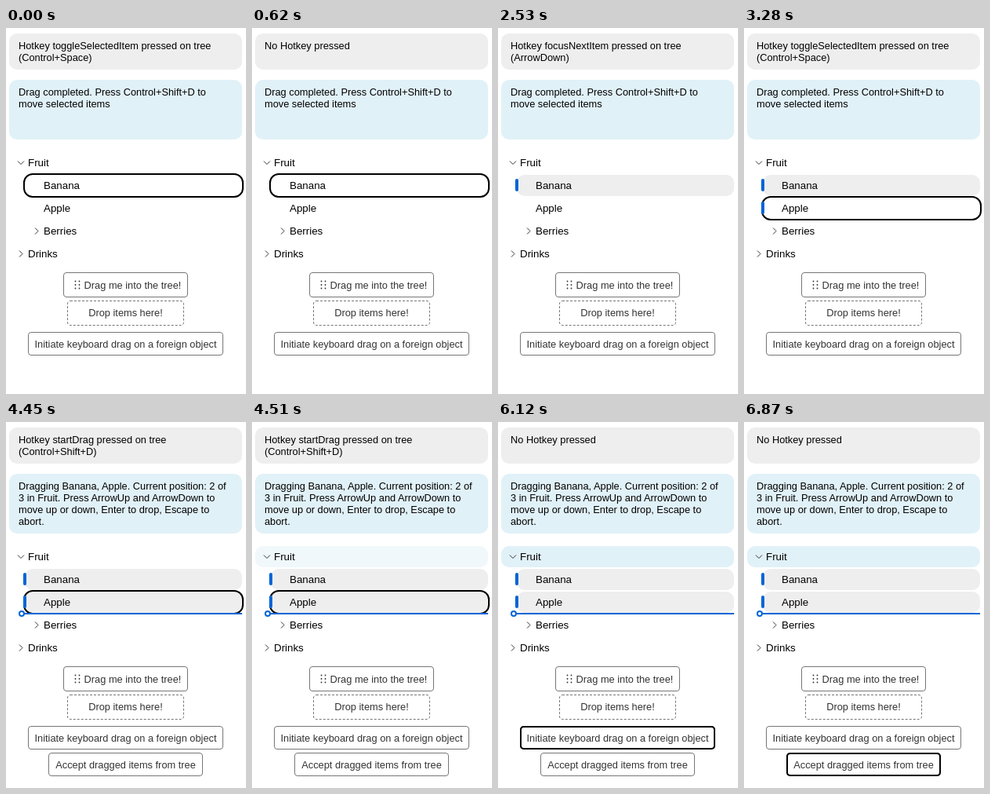
An HTML page for the animation above (8000 ms loop, 306 by 466 pixels).

```html
<!DOCTYPE html>
<html lang="en">
<head>
<meta charset="utf-8">
<title>Keyboard tree drag</title>
<style>
  html, body { margin: 0; width: 100%; height: 100%; overflow: hidden; background: #fff; }
  svg { display: block; }
  text { font: 12.8px "Liberation Sans", Arial, sans-serif; fill: #000; white-space: pre; }
  .item text { font-size: 13.333px; }
  .button text { fill: #333; text-anchor: middle; }
  .button rect { fill: none; stroke: #767676; }
  .button rect.focus { stroke: #000; stroke-width: 2; }
  .ring { fill: none; stroke: #000; stroke-width: 2; }
  .chevron { fill: none; stroke: #333; }
</style>
</head>
<body>
<svg id="stage" width="306" height="466" viewBox="0 0 306 466"></svg>
<script>
const NS = "http://www.w3.org/2000/svg";
const stage = document.getElementById("stage");
const LOOP = 8000, FADE = 200;
const GRAY = "#eee", PALE = "#e1f1f8", BLUE = "#0366d6";

function add(parent, tag, attrs = {}, content = "") {
  const el = document.createElementNS(NS, tag);
  for (const key in attrs) el.setAttribute(key, attrs[key]);
  if (content) el.textContent = content;
  parent.appendChild(el);
  return el;
}

const box = (parent, x, y, width, height, rx, fill) =>
  add(parent, "rect", { x, y, width, height, rx, fill });

const show = (el, on) => el.setAttribute("visibility", on ? "visible" : "hidden");

// Rounded panel with left-aligned lines; returns a setter for its text
function panel(y, height, fill, rows) {
  box(stage, 4, y, 297, height, 10, fill);
  const lines = Array.from({ length: rows }, (_, i) =>
    add(stage, "text", { x: 16, y: y + 20 + i * 15 }));
  let current = null;
  return value => {
    if (value === current) return;
    current = value;
    const parts = value.split("\n");
    lines.forEach((line, i) => { line.textContent = parts[i] || ""; });
  };
}

function treeItem(label, y, depth, arrow, tint = GRAY) {
  const x = 4 + depth * 20;
  const g = add(stage, "g", { class: "item" });
  const back = box(g, x, y, 301 - x, 27, 10, tint);
  back.setAttribute("opacity", 0);
  add(g, "text", { x: x + 24, y: y + 18 }, label);
  if (arrow) {
    const d = arrow === "down" ? "M-4 -2L0 2L4 -2" : "M-2 -4L2 0L-2 4";
    add(g, "path", { d, class: "chevron", transform: `translate(${x + 15} ${y + 13.5})` });
  }
  const ring = add(g, "rect", {
    x: x - 1, y: y - 1, width: 303 - x, height: 29, rx: 11, class: "ring"
  });
  const bar = box(g, x - 2, y + 5, 4, 16, 2, BLUE);
  show(ring, false);
  show(bar, false);
  return { back, ring, bar };
}

function button(label, x, y, width, height, labelX, baseline) {
  const g = add(stage, "g", { class: "button" });
  const frame = add(g, "rect", {
    x: x + 0.5, y: y + 0.5, width: width - 1, height: height - 1, rx: 3.5
  });
  add(g, "text", { x: labelX, y: baseline }, label);
  const ring = add(g, "rect", {
    x: x + 1, y: y + 1, width: width - 2, height: height - 2, rx: 4, class: "focus"
  });
  show(ring, false);
  return { g, frame, ring };
}

const setHotkey = panel(7, 46, GRAY, 2);
const setMessage = panel(66, 76, PALE, 4);

const fruit = treeItem("Fruit", 158, 0, "down", PALE);
const banana = treeItem("Banana", 187, 1);
const apple = treeItem("Apple", 216, 1);
treeItem("Berries", 245, 1, "right");
treeItem("Drinks", 274, 0, "right");

const dragLine = add(stage, "g");
box(dragLine, 22, 243, 279, 2, 0, BLUE);
add(dragLine, "circle", { cx: 20, cy: 244, r: 3, fill: "#fff", stroke: BLUE, "stroke-width": 2 });

const dragMe = button("Drag me into the tree!", 73, 311, 159, 32, 161.5, 332);
for (let i = 0; i < 6; i++) {
  add(dragMe.g, "circle", {
    cx: 88.5 + (i % 2) * 5, cy: 322.5 + Math.floor(i / 2) * 4.5, r: 0.9, fill: "#333"
  });
}
const dropHere = button("Drop items here!", 78, 347, 149, 32, 152.5, 367);
dropHere.frame.setAttribute("stroke-dasharray", "3 2");
const initiate = button("Initiate keyboard drag on a foreign object", 28, 387, 249, 30, 152.5, 407);
const accept = button("Accept dragged items from tree", 54, 421, 197, 30, 152.5, 441);

const hotkey = (name, keys) => `Hotkey ${name} pressed on tree\n(${keys})`;
const TOGGLE = hotkey("toggleSelectedItem", "Control+Space");
const HOTKEYS = [
  [0, TOGGLE],
  [620, "No Hotkey pressed"],
  [2530, hotkey("focusNextItem", "ArrowDown")],
  [3280, TOGGLE],
  [4450, hotkey("startDrag", "Control+Shift+D")],
  [5940, "No Hotkey pressed"]
];
const DONE = "Drag completed. Press Control+Shift+D to\nmove selected items";
const DRAGGING = "Dragging Banana, Apple. Current position: 2 of\n" +
  "3 in Fruit. Press ArrowUp and ArrowDown to\n" +
  "move up or down, Enter to drop, Escape to\nabort.";

const SELECT_BANANA = 1670, SELECT_APPLE = 3280, DRAG = 4450;

function fade(t, start) {
  const p = Math.min(1, Math.max(0, (t - start) / FADE));
  return 1 - (1 - p) ** 2;
}

function draw(t) {
  const within = (from, to) => t >= from && t < to;
  const dragging = t >= DRAG;

  setHotkey(HOTKEYS.filter(([start]) => start <= t).pop()[1]);
  setMessage(dragging ? DRAGGING : DONE);

  fruit.back.setAttribute("opacity", fade(t, DRAG));
  banana.back.setAttribute("opacity", fade(t, SELECT_BANANA));
  apple.back.setAttribute("opacity", fade(t, SELECT_APPLE));
  show(banana.bar, t >= SELECT_BANANA);
  show(apple.bar, t >= SELECT_APPLE);

  show(banana.ring, t < 2530);
  show(apple.ring, within(2590, 6120));
  show(initiate.ring, within(6120, 6870));
  show(accept.ring, t >= 6870);

  show(dragLine, dragging);
  accept.g.setAttribute("display", dragging ? "inline" : "none");
}

let begin = null;
function tick(now) {
  if (begin === null) begin = now;
  draw((now - begin) % LOOP);
  requestAnimationFrame(tick);
}
draw(0);
requestAnimationFrame(tick);
</script>
</body>
</html>
```
